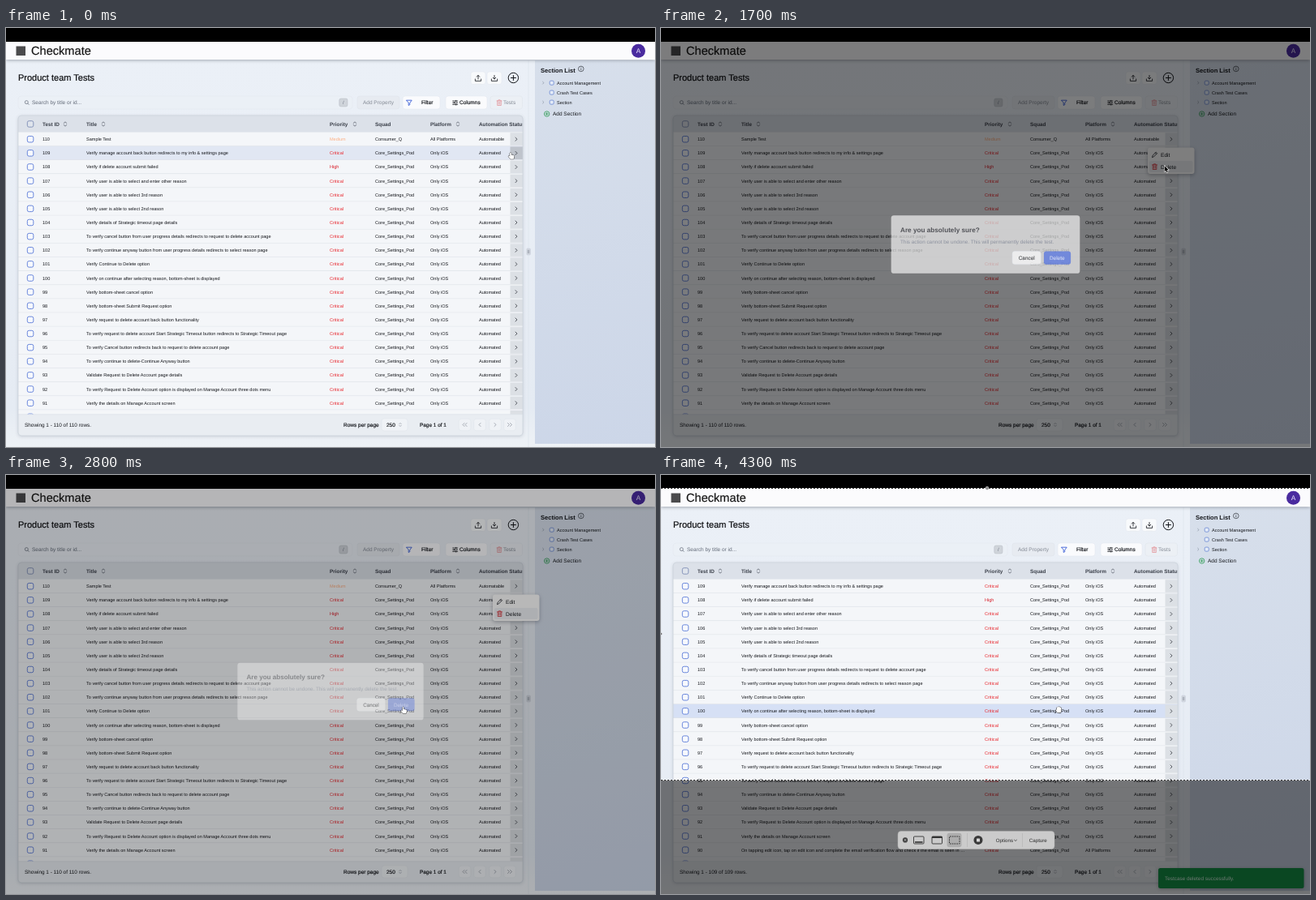
An HTML page with a canvas for the animation above (4400 ms loop, 800 by 517 pixels).

```html
<!DOCTYPE html>
<html lang="en">
<head>
<meta charset="utf-8">
<title>Test list</title>
<style>
html, body { margin: 0; width: 100%; height: 100%; overflow: hidden; background: #e9eef5; }
canvas { display: block; width: 800px; height: 517px; }
</style>
</head>
<body>
<canvas id="stage"></canvas>
<script>
const W = 800, H = 517, LOOP = 4400, STEP = 100;
const ROW_TOP = 128.7, ROW_H = 17.13;
const FONT = '"Liberation Sans", Arial, sans-serif';
const canvas = document.getElementById('stage');
const dpr = window.devicePixelRatio || 1;
canvas.width = W * dpr;
canvas.height = H * dpr;
const c = canvas.getContext('2d');

const titles = [
  'Sample Test',
  'Verify manage account back button redirects to my info & settings page',
  'Verify if delete account submit failed',
  'Verify user is able to select and enter other reason',
  'Verify user is able to select 3rd reason',
  'Verify user is able to select 2nd reason',
  'Verify details of Strategic timeout page details',
  'To verify cancel button from user progress details redirects to request to delete account page',
  'To verify continue anyway button from user progress details redirects to select reason page',
  'Verify Continue to Delete option',
  'Verify on continue after selecting reason, bottom-sheet is displayed',
  'Verify bottom-sheet cancel option',
  'Verify bottom-sheet Submit Request option',
  'Verify request to delete account back button functionality',
  'To verify request to delete account Start Strategic Timeout button redirects to Strategic Timeout page',
  'To verify Cancel button redirects back to request to delete account page',
  'To verify continue to delete-Continue Anyway button',
  'Validate Request to Delete Account page details',
  'To verify Request to Delete Account option is displayed on Manage Account three dots menu',
  'Verify the details on Manage Account screen',
  'On tapping edit icon, tap on edit icon and complete the email verification flow and check if the email is seen in …'
];
const rows = titles.map((title, i) => ({
  id: 110 - i,
  title,
  priority: i === 0 ? 'Medium' : i === 2 ? 'High' : 'Critical',
  squad: i === 0 ? 'Consumer_Q' : 'Core_Settings_Pod',
  platform: i === 0 || i === 20 ? 'All Platforms' : 'Only iOS',
  status: i === 0 ? 'Automatable' : 'Automated'
}));
const priorityColor = { Medium: '#fdb084', High: '#d8202c', Critical: '#e8232a' };

// Linear interpolation over [time, value...] keys
function key(t, keys) {
  if (t <= keys[0][0]) return keys[0].slice(1);
  for (let i = 1; i < keys.length; i++) {
    const a = keys[i - 1], b = keys[i];
    if (t <= b[0]) {
      const p = (t - a[0]) / (b[0] - a[0]);
      return a.slice(1).map((v, j) => v + (b[j + 1] - v) * p);
    }
  }
  return keys[keys.length - 1].slice(1);
}

function txt(s, x, y, size = 6.5, color = '#15171c', weight = '') {
  c.font = `${weight === 'bold' ? 'bold ' : ''}${size}px ${FONT}`;
  c.fillStyle = color;
  c.fillText(s, x, y + size * 0.35);
  if (weight === 'medium') {
    c.strokeStyle = color;
    c.lineWidth = 0.18;
    c.strokeText(s, x, y + size * 0.35);
  }
}

function box(x, y, w, h, r, fill, stroke, lw = 0.6) {
  c.beginPath();
  c.roundRect(x, y, w, h, r);
  if (fill) { c.fillStyle = fill; c.fill(); }
  if (stroke) { c.strokeStyle = stroke; c.lineWidth = lw; c.stroke(); }
}

function disc(x, y, r, fill, stroke, lw = 0.7) {
  c.beginPath();
  c.arc(x, y, r, 0, 7);
  if (fill) { c.fillStyle = fill; c.fill(); }
  if (stroke) { c.strokeStyle = stroke; c.lineWidth = lw; c.stroke(); }
}

function icon(d, x, y, color, lw = 0.8, fill) {
  const p = new Path2D(d);
  c.save();
  c.translate(x, y);
  c.lineCap = c.lineJoin = 'round';
  c.strokeStyle = color;
  c.lineWidth = lw;
  c.stroke(p);
  if (fill) { c.fillStyle = fill; c.fill(p); }
  c.restore();
}

function shadow(color, blur, dy, draw) {
  c.save();
  c.shadowColor = color;
  c.shadowBlur = blur * dpr;
  c.shadowOffsetY = dy * dpr;
  draw();
  c.restore();
}

const RIGHT = 'M-1 -2 L1 0 L-1 2', LEFT = 'M1 -2 L-1 0 L1 2';
const TRASH = 'M-3 -2.3 H3 M-1.1 -2.3 V-3.4 H1.1 V-2.3 M-2.3 -2.3 V3.3 H2.3 V-2.3 M-.8 -.8 V1.9 M.8 -.8 V1.9';
const SORT = 'M-1.8 -1 L0 -2.7 L1.8 -1 M-1.8 1 L0 2.7 L1.8 1';
const PLUS = 'M-1 0 H1 M0 -1 V1';

function drawHeader() {
  c.fillStyle = '#000';
  c.fillRect(0, 0, W, 17);
  shadow('rgba(70,75,90,.45)', 4, 1, () => {
    c.fillStyle = '#fbfbfd';
    c.fillRect(0, 17, W, 22);
  });
  c.fillStyle = '#000';
  c.fillRect(0, 0, W, 17);
  box(12.5, 22.5, 11.5, 11.5, 0, '#4b4b4d');
  txt('Checkmate', 31, 28.2, 14.6, '#141414', 'medium');
  disc(779.5, 28.3, 8.5, '#4a2b9f');
  txt('A', 776.7, 28.4, 8.3, '#eeeaff');
}

function drawTools() {
  txt('Product team Tests', 15, 61.5, 11, '#0c0d10', 'medium');
  for (const [x, tip] of [[582, 'M-1.8 -1.8 L0 -3.6 L1.8 -1.8'], [602, 'M-1.8 -.8 L0 1 L1.8 -.8']]) {
    box(x - 9, 54, 18, 15.5, 3, '#f8fafc', '#e0e5ec', 0.5);
    icon(tip + ' M0 -3.6 V1 M-3.6 1 V3.4 H3.6 V1', x, 62, '#1d1f25', 0.85);
  }
  disc(625.4, 61.5, 6.2, null, '#111317', 1);
  icon('M-3 0 H3 M0 -3 V3', 625.4, 61.5, '#111317', 1);

  box(15, 84, 412, 16, 3.5, '#ebf0f6', '#e0e5ec', 0.5);
  disc(25.3, 91.6, 2, null, '#5f6674', 0.7);
  icon('M0 0 L1.4 1.4', 26.8, 93.1, '#5f6674', 0.7);
  txt('Search by title or id...', 32, 92.2, 6.5, '#626977');
  box(410.8, 87, 10.2, 10, 2, '#cfd4da', '#b5bac2', 0.5);
  txt('/', 415, 92, 6, '#6b7280');

  box(433, 84, 52, 16, 3, '#e7ebf1', '#dde2e9', 0.5);
  txt('Add Property', 440, 92.2, 6.5, '#858b96');
  box(489, 84, 46, 16, 3, '#fafbfd', '#e0e5ec', 0.5);
  icon('M-3.2 -3 H3.2 L.8 .2 V2.4 L-.8 3.3 V.2 Z', 497, 92.2, '#3157d5', 0.85);
  txt('Filter', 512, 92.2, 6.5, '#15171c', 'medium');
  box(542, 84, 51, 16, 3, '#fafbfd', '#e0e5ec', 0.5);
  icon('M-3 -2.2 H3 M-3 0 H3 M-3 2.2 H3 M1 -2.9 V-1.5 M-1.2 -.7 V.7 M1 1.5 V2.9', 553.7, 92.2, '#15171c', 0.8);
  txt('Columns', 559, 92.2, 6.5, '#15171c', 'medium');
  box(597, 84, 39.5, 16, 3, '#ecf0f5', '#dde2e9', 0.5);
  icon(TRASH, 608, 92.2, '#e28d92', 0.7);
  txt('Tests', 613, 92.2, 6.5, '#858b96');
}

function drawRow(row, i, hover, hot) {
  const top = ROW_TOP + i * ROW_H, y = top + ROW_H / 2;
  c.fillStyle = hover || '#f4f6f9';
  c.fillRect(15, top, 622, ROW_H);
  c.fillStyle = '#dfe3e9';
  c.fillRect(15, top + ROW_H - 0.7, 622, 0.7);
  box(26.3, y - 3.8, 7.5, 7.5, 2, '#f7f9fd', '#5b7bd9', 0.9);
  txt(row.id, 45, y, 5.55);
  txt(row.title, 99, y, 5.55);
  txt(row.priority, 399, y, 5.55, priorityColor[row.priority]);
  txt(row.squad, 455, y, 5.55);
  txt(row.platform, 523, y, 5.55);
  txt(row.status, 583, y, 5.55);
  c.fillStyle = hot ? '#bfc4cc' : '#dce0e5';
  c.fillRect(621.5, top + 0.6, 15.5, ROW_H - 1.6);
  icon(RIGHT, 629, y, '#30343c', 0.8);
}

function drawTable(first, hoverRow, hoverColor, hot) {
  shadow('rgba(60,70,90,.22)', 4, 1, () => box(15, 108, 622, 395, 4, '#eaeef3'));
  c.save();
  c.beginPath();
  c.roundRect(15, 108, 622, 395, 4);
  c.clip();
  c.fillStyle = '#dce1e9';
  c.fillRect(15, 108, 622, 20.7);
  box(26.3, 114.7, 7.5, 7.5, 2, '#dfe4ec', '#7d8db5', 0.9);
  const heads = [['Test ID', 45, 73], ['Title', 99, 120], ['Priority', 399, 430], ['Squad', 455], ['Platform', 523, 557], ['Automation Status', 583]];
  for (const [name, x, sort] of heads) {
    txt(name, x, 118.5, 6.4, '#3a3f49', 'bold');
    if (sort) icon(SORT, sort, 118.5, '#4a505c', 0.7);
  }
  c.save();
  c.beginPath();
  c.rect(15, 128, 622, 349);
  c.clip();
  for (let i = 0; i < 21; i++) {
    const row = rows[first + i] || rows[20];
    drawRow(row, i, i === hoverRow && hoverColor, i === hoverRow && hot);
  }
  c.restore();

  c.fillStyle = '#e9edf2';
  c.fillRect(15, 476.6, 622, 27);
  c.fillStyle = '#d8dde4';
  c.fillRect(15, 476.6, 622, 0.6);
  const n = 110 - first;
  txt(`Showing 1 - ${n} of ${n} rows.`, 23, 489.5, 6.42);
  txt('Rows per page', 416, 489.5, 6.5, '#15171c', 'medium');
  box(463, 482, 32, 15, 3, '#f0f3f7', '#dde2e9', 0.5);
  txt('250', 469, 489.5, 6.5, '#15171c', 'medium');
  icon('M-1.3 -.8 L0 -2.1 L1.3 -.8 M-1.3 .8 L0 2.1 L1.3 .8', 486, 489.5, '#838995', 0.6);
  txt('Page 1 of 1', 510, 489.5, 6.45, '#15171c', 'medium');
  [[LEFT, 565.5, 2], [LEFT, 584, 1], [RIGHT, 603, 1], [RIGHT, 621, 2]].forEach(([d, x, count]) => {
    box(x - 7.3, 482.2, 14.6, 14.6, 3, '#eff2f6', '#dde2e8', 0.5);
    for (let k = 0; k < count; k++) icon(d, x + (count - 1) * (k * 3 - 1.5), 489.5, '#868c97', 0.7);
  });
  c.restore();
  box(15, 108, 622, 395, 4, null, '#cbd1da', 0.7);
}

function drawSidebar() {
  c.fillStyle = '#dfe5ee';
  c.fillRect(643.6, 40, 0.8, 477);
  box(641.8, 272, 4.6, 8, 1, '#d5dae2', '#bcc3ce', 0.4);
  icon('M-.7 -1.8 V1.8 M.7 -1.8 V1.8', 644.1, 276, '#737b88', 0.5);
  const g = c.createLinearGradient(652, 40, 800, 513);
  g.addColorStop(0, '#d7dfeb');
  g.addColorStop(1, '#ccd6e8');
  c.fillStyle = g;
  c.fillRect(652, 40, 148, 473);
  txt('Section List', 659, 52, 7.55, '#14161b', 'bold');
  disc(708.8, 50.4, 3.3, null, '#30343c', 0.7);
  icon('M0 -.1 V1.5 M0 -1.5 V-1.4', 708.8, 50.4, '#30343c', 0.7);
  [['Account Management', 67.7, 1], ['Crash Test Cases', 79.6, 0], ['Section', 91.6, 1]].forEach(([name, y, open]) => {
    if (open) icon('M-.7 -1.4 L.7 0 L-.7 1.4', 662.3, y, '#7d8796', 0.6);
    box(670.2, y - 2.5, 5, 5, 1.4, '#e4ebf7', '#6584d2', 0.8);
    txt(name, 679, y, 5.55);
  });
  disc(666.7, 106, 3.2, null, '#2c9b52', 0.8);
  icon('M-1.6 0 H1.6 M0 -1.6 V1.6', 666.7, 106, '#2c9b52', 0.8);
  txt('Add Section', 674, 106, 6.5);
}

function drawMenu(active) {
  shadow('rgba(40,45,60,.35)', 5, 1.5, () => box(600, 147.5, 57.5, 32.5, 3, '#fff'));
  if (active >= 0) box(602, 149.3 + active * 14.8, 53.5, 14, 2, '#eff2f6');
  icon('M-3 3 L-2.4 .9 L1.7 -3.1 L3.1 -1.7 L-.9 2.4 Z M.8 -2.2 L2.2 -.8', 608.5, 156.3, '#22252c', 0.8);
  txt('Edit', 616, 156.3, 6.6);
  icon(TRASH, 608.5, 171.2, '#d94249', 0.85);
  txt('Delete', 616, 171.2, 6.6);
}

function drawDialog(p) {
  c.fillStyle = `rgba(0,0,0,${0.8 * p})`;
  c.fillRect(0, 17, W, H - 17);
  c.save();
  c.globalAlpha = p;
  c.translate(400, 267);
  c.scale(0.95 + 0.05 * p, 0.95 + 0.05 * p);
  c.translate(-400, -267);
  box(281.5, 230.5, 237, 73, 3.5, '#fff');
  txt('Are you absolutely sure?', 293, 248.5, 8.35, '#0b0d14', 'bold');
  txt('This action cannot be undone. This will permanently delete the test.', 293, 263.8, 6.47, '#687185');
  box(433.7, 275.7, 35.8, 16.3, 3, '#fff', '#dfe3e9', 0.7);
  txt('Cancel', 441.5, 283.9, 6.5, '#14161b', 'medium');
  box(473.3, 275.6, 33.8, 16.5, 3, '#3f63e2');
  txt('Delete', 480.5, 283.9, 6.5, '#f5f7ff', 'medium');
  c.restore();
}

function drawToast(y) {
  shadow('rgba(0,0,0,.25)', 4, 1, () => box(613, y, 179.5, 25, 2.5, '#149447'));
  txt('Testcase deleted successfully.', 621, y + 12.3, 6.4, '#e9fff1');
}

function dashes(y) {
  c.save();
  c.lineWidth = 1;
  c.strokeStyle = '#e8e8e8';
  c.beginPath();
  c.moveTo(0, y);
  c.lineTo(W, y);
  c.stroke();
  c.setLineDash([2, 2]);
  c.strokeStyle = '#333';
  c.stroke();
  c.restore();
}

function drawCapture(p) {
  c.save();
  c.globalAlpha = p;
  c.fillStyle = 'rgba(0,0,0,.52)';
  c.fillRect(0, 376.5, W, H - 376.5);
  dashes(16.5);
  dashes(376.5);
  disc(402, 16.3, 2, '#8d8d8d', '#d5d5d5', 0.6);
  disc(0, 196, 1.3, '#777');
  box(292, 439.5, 193, 22, 4, '#cbcbcb', '#b0b0b0', 0.5);
  disc(301, 450.4, 3.1, '#3e3e3e');
  icon('M-1 -1 L1 1 M1 -1 L-1 1', 301, 450.4, '#ddd', 0.7);
  box(311.5, 446, 12.5, 9, 1, null, '#333', 0.9);
  c.fillStyle = '#333';
  c.fillRect(313, 452.2, 9.5, 1.6);
  box(334, 446, 12.5, 9, 1, null, '#333', 0.9);
  c.fillRect(334, 446, 12.5, 2);
  box(352.5, 441.7, 18, 17.6, 3, '#adadad');
  c.setLineDash([1.7, 1.1]);
  box(355.5, 446, 12.5, 9, 0.5, null, '#222', 0.9);
  c.setLineDash([]);
  c.fillStyle = '#b2b2b2';
  for (const x of [377, 445]) c.fillRect(x, 442, 0.6, 17);
  disc(391, 450.4, 5.5, '#3a3a3a');
  box(389, 448.4, 4, 4, 0.5, '#d8d8d8');
  txt('Options', 412.8, 450.5, 6.15, '#2b2b2b');
  icon('M-1.5 -.6 L0 .8 L1.5 -.6', 437, 450.8, '#2b2b2b', 0.7);
  txt('Capture', 453.8, 450.5, 6.2, '#2b2b2b');
  c.restore();
}

function drawCursor(x, y, kind) {
  if (kind === 'arrow') {
    icon('M0 0 V7.2 L1.7 5.7 L2.8 8.2 L4 7.7 L2.9 5.2 H5.1 Z', x, y, '#fff', 1.1, '#000');
  } else if (kind === 'hand') {
    icon('M-.8 .7 Q0 -.5 .8 .7 V3 L3.6 3.6 Q4.8 4 4.5 5.3 L3.7 8.2 H-.2 L-2.6 5.2 Q-2.8 3.8 -1.5 4.4 L-.8 5.1 Z', x, y, '#111', 0.8, '#fff');
  } else {
    icon('M-1.6 1 Q-.8 -.6 0 .5 Q.8 -.9 1.6 .5 Q2.6 -.3 3 1 Q4 .6 3.9 2 V4.5 L3 7.3 H-1 L-3 4 Q-3 2.8 -1.6 3.8 Z', x, y, '#111', 0.8, '#fff');
  }
}

function draw(t) {
  c.setTransform(dpr, 0, 0, dpr, 0, 0);
  c.textRendering = 'geometricPrecision';
  const g = c.createLinearGradient(0, 40, 0, H);
  g.addColorStop(0, '#ebf0f7');
  g.addColorStop(0.9, '#e5ebf3');
  g.addColorStop(1, '#eef2f6');
  c.fillStyle = g;
  c.fillRect(0, 0, W, H);

  const menu = t >= 300 && t < 2900;
  const deleted = t >= 3400;
  let hoverRow = -1, hoverColor = '#e1e7f3';
  if (t < 300) hoverRow = 1;
  if (t >= 3000) { hoverRow = 9; hoverColor = '#d6e0f5'; }

  drawSidebar();
  drawHeader();
  drawTools();
  drawTable(deleted ? 1 : 0, hoverRow, hoverColor, t < 300);
  if (menu) drawMenu(t < 500 ? -1 : t < 1200 ? 0 : 1);

  const [fade] = key(t, [[1600, 0], [1700, 0.63], [1800, 1], [2700, 1], [2800, 0.35], [2900, 0]]);
  if (fade > 0) drawDialog(fade);
  if (deleted) drawToast(key(t, [[3400, 507], [3500, 495], [3600, 487.5], [3700, 485]])[0]);
  if (t >= 4100) drawCapture(key(t, [[4100, 0.4], [4200, 0.8], [4300, 1]])[0]);

  const [x, y] = key(t, [
    [0, 622, 153.5], [400, 622, 153.5], [700, 622, 157], [1000, 622, 161],
    [1200, 620.7, 170], [1800, 620.7, 170], [1900, 612, 178], [2000, 584, 202],
    [2100, 544, 238], [2200, 511, 268], [2300, 495, 281], [2400, 489.5, 286]
  ]);
  const kind = t < 300 || (t >= 2300 && t < 3000) ? 'hand' : t >= 4200 ? 'grab' : 'arrow';
  if (t === 100 || t === 200) disc(x, y, 14, null, '#30343c', 1);
  if (t === 1400 || t === 1500) disc(x, y, 14, null, '#30343c', 1);
  if (t >= 2500 && t < 2800) disc(489, 285.3, t < 2600 ? 12.5 : 14.5, null, '#20242e', 1);
  drawCursor(x, y, kind);
}

const start = performance.now();
let last = -1;
function tick() {
  const t = Math.floor(((performance.now() - start) % LOOP) / STEP) * STEP;
  if (t !== last) draw(last = t);
  requestAnimationFrame(tick);
}
tick();
</script>
</body>
</html>
```
